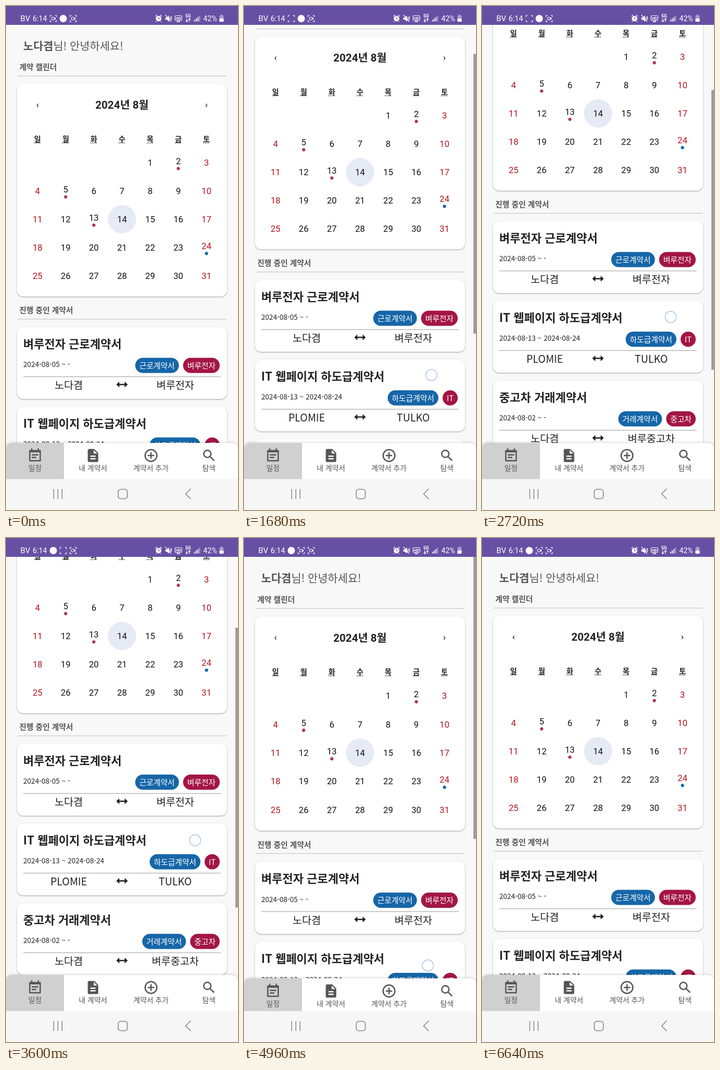
These frames come from a looping animation (444x962 px, 6720 ms). An HTML page:

```html
<!DOCTYPE html>
<html lang="ko">
<head>
<meta charset="utf-8">
<style>
  html, body { margin: 0; height: 100%; overflow: hidden; background: #f8f8f8; }
  svg { display: block; width: 100vw; height: 100vh; }
  text { font-family: "Noto Sans CJK KR", "Noto Sans CJK JP", sans-serif; white-space: pre; }
  .num { font-family: Roboto, "Noto Sans CJK KR", "Noto Sans CJK JP", sans-serif; }
  .card { fill: #fff; filter: drop-shadow(0 1px 1px rgba(0, 0, 0, .36)); }
  .line { fill: none; stroke-width: 2; stroke-linejoin: round; }
</style>
</head>
<body>
<svg id="stage" viewBox="0 0 444 962" preserveAspectRatio="none"></svg>
<script>
const LOOP = 6720, STEP = 80, TOP = 36;
const BLUE = '#1666a8', RED = '#a31545', GRAY = '#555';
const PERSON = '노다겸', COMPANY = '벼루전자';

// Text centred vertically on cy.
const text = (x, cy, size, label, { fill = '#222', weight = 400, anchor = 'start', cls = '' } = {}) =>
  `<text x="${x}" y="${cy + size * .36}" font-size="${size}" fill="${fill}" font-weight="${weight}" text-anchor="${anchor}" class="${cls}">${label}</text>`;
const middle = (x, cy, size, label, options) => text(x, cy, size, label, { anchor: 'middle', ...options });
const rect = (x, y, w, h, fill, r = 0, more = '') =>
  `<rect x="${x}" y="${y}" width="${w}" height="${h}" rx="${r}" fill="${fill}" ${more}/>`;
const circle = (x, y, r, fill, more = '') => `<circle cx="${x}" cy="${y}" r="${r}" fill="${fill}" ${more}/>`;
const path = (d, more) => `<path d="${d}" ${more}/>`;
const section = (cy, label) =>
  text(25.5, cy, 14.7, label, { fill: GRAY, weight: 700 }) + rect(22, cy + 16, 400, 1.3, '#cacaca');

function calendar() {
  const columnX = column => 60.3 + column * 53.9;
  const events = { 2: '#b03360', 5: '#b03360', 13: '#b03360', 24: BLUE };
  let out = rect(21, 149, 402, 405.5, '#fff', 12, 'class="card"');
  out += middle(222, 189, 20.6, '2024년 8월', { weight: 700, cls: 'num' });
  out += middle(60.3, 188, 17, '‹', { cls: 'num', fill: '#000' }) + middle(383.5, 188, 17, '›', { cls: 'num', fill: '#000' });
  [...'일월화수목금토'].forEach((day, column) => {
    const x = columnX(column);
    out += middle(x, 254, 14.2, day, { weight: 700 });
    out += path(`M${x - 6.5} 261.3h13`, 'stroke="#222" stroke-width="1.3" stroke-dasharray="2 1.2"');
  });
  out += circle(222, 407, 27, '#e6eaf5');
  for (let day = 1; day <= 31; day++) {
    const column = (day + 3) % 7, x = columnX(column);
    const y = 299 + Math.floor((day + 3) / 7) * 54;
    const fill = column % 6 ? '#111' : '#b5121b';
    out += middle(x, events[day] ? y - 3 : y, 16.6, day, { fill, cls: 'num' });
    if (events[day]) out += circle(x, y + 11.3, 3.1, events[day]);
  }
  return out;
}

function chip(right, y, label, fill) {
  const width = 16 + label.length * 14.7 * (/[A-Z]/.test(label) ? .44 : .92);
  return {
    left: right - width,
    svg: rect(right - width, y, width, 29, fill, 14.5) +
      middle(right - width / 2, y + 15, 14.7, label, { fill: '#fff' }),
  };
}

function contract(index, { title, dates, kind, tag, from, to }) {
  const y = 613 + index * 152;
  const tagChip = chip(409, y + 58.5, tag, RED);
  const kindChip = chip(tagChip.left - 8, y + 58.5, kind, BLUE);
  return rect(21, y, 402, 137, '#fff', 12, 'class="card"') +
    text(33, y + 32, 22, title, { weight: 700 }) +
    text(33, y + 71.5, 13.6, dates) +
    kindChip.svg + tagChip.svg +
    rect(33, y + 94, 378, 1.2, '#aaa') +
    middle(120, y + 111, 19.6, from) + middle(324, y + 111, 19.6, to) +
    path(`M211 ${y + 109.5}l6-5.5v4.3h10v-4.3l6 5.5-6 5.5v-4.3h-10v4.3z`, 'fill="#222"');
}

function navigation() {
  const tabs = [
    ['일정', '<path class="line" d="M4 4.5H20V20H4zM4 6.2H20M7 1V4M17 1V4M7 11H17M7 15H14"/>'],
    ['내 계약서', '<path fill="#555" stroke="none" fill-rule="evenodd" d="M6 2H14L20 8V20Q20 22 18 22H6Q4 22 4 20V4Q4 2 6 2zM13 3.5V9H18.5zM8 12V14H16V12zM8 16V18H16V16z"/>'],
    ['계약서 추가', '<path class="line" d="M12 7V17M7 12H17"/><circle class="line" cx="12" cy="12" r="9"/>'],
    ['탐색', '<path class="line" d="M14 14L19.8 19.8"/><circle class="line" cx="9.5" cy="9.5" r="5.5"/>'],
  ];
  const shape = 'M0 910V846Q0 834 12 834H432Q444 834 444 846V910z';
  return path(shape, 'fill="#fff" style="filter:drop-shadow(0 -1px 2px rgba(0,0,0,.16))"') +
    path('M0 910V846Q0 834 12 834H111V910z', 'fill="#d0d0d0"') +
    tabs.map(([label, icon], i) => {
      const x = 55.5 + i * 111;
      return `<g transform="translate(${x - 15} 843) scale(1.25)" stroke="${GRAY}">${icon}</g>` +
        middle(x, 882.5, 13.8, label, { fill: GRAY });
    }).join('');
}

// Screen-recording icon: corner brackets around a small camera.
const recorder = (x, id = '') => `<g transform="translate(${x} 24)">` +
  path('M-6-3V-6H-3M3-6H6V-3M6 3V6H3M-3 6H-6V3', 'fill="none" stroke="#fff" stroke-width="1.2"') +
  `<g id="${id}">` + rect(-3, -2.5, 5, 5, 'none', 1, 'stroke="#fff" stroke-width="1.2"') +
  path('M2 0L4.5-2.5V2.5z', 'fill="#fff"') + '</g></g>';

function statusBar() {
  const white = { fill: '#fff', cls: 'num' };
  const stroke = 'fill="none" stroke="#fff" stroke-width="1.3"';
  let out = rect(0, 0, 444, TOP, '#6650a3');
  out += text(27.5, 24, 15, 'BV', white) + text(51, 24, 14.2, '6:14', white);
  out += `<g id="recording">${recorder(0, 'camera')}</g><g id="message">${circle(0, 24, 7, '#fff')}</g>` + recorder(128.5);
  // Alarm, mute, HD, mobile data, signal, battery
  out += circle(292, 24, 5.3, '#fff') + path('M286 20l3-3M298 20l-3-3M288 29l-1 1.5M296 29l1 1.5', stroke);
  out += path('M292 21v3.5h2.5', 'fill="none" stroke="#6650a3" stroke-width="1.2"');
  out += path('M305 22h3l4-4v12l-4-4h-3z', 'fill="#fff"') + path('M305 17l11 13M314 21v5M316.5 19v8', stroke);
  out += rect(323.5, 18.5, 13, 9, 'none', 1.5, 'stroke="#fff" stroke-width="1.1"') + middle(330, 23, 7.5, 'HD', { ...white, weight: 700 });
  out += path('M328 28v2h4v-2', stroke);
  out += middle(348.5, 19, 8.5, '5G', { ...white, weight: 700 });
  out += path('M346 24v6M344 28l2 2 2-2M351 30v-6M349 26l2-2 2 2', stroke);
  for (let i = 0; i < 4; i++) out += rect(360 + i * 3.2, 26.5 - i * 2.7, 1.8, 3 + i * 2.7, '#fff', 0, i > 2 ? 'opacity=".5"' : '');
  out += text(377.5, 24, 14.2, '42%', white);
  out += rect(408.5, 18, 8, 12, '#a99bce', 1.5) + rect(410.5, 16.5, 4, 2, '#a99bce') + rect(408.5, 24, 8, 6, '#fff', 1.5);
  return out;
}

function systemBar() {
  return rect(0, 903, 444, 59, '#f6f6f6') +
    path('M91.3 922v19M99.3 922v19M107.3 922v19', 'stroke="#888" stroke-width="1.5"') +
    rect(214.7, 922.5, 17.6, 18, 'none', 5, 'stroke="#888" stroke-width="1.6"') +
    path('M353.5 921.5l-9.7 9.7 9.7 9.7', 'fill="none" stroke="#888" stroke-width="1.6"');
}

const contracts = [
  { title: `${COMPANY} 근로계약서`, dates: '2024-08-05 ~ -', kind: '근로계약서', tag: COMPANY, from: PERSON, to: COMPANY },
  { title: 'IT 웹페이지 하도급계약서', dates: '2024-08-13 ~ 2024-08-24', kind: '하도급계약서', tag: 'IT', from: 'PLOMIE', to: 'TULKO' },
  { title: '중고차 거래계약서', dates: '2024-08-02 ~ -', kind: '거래계약서', tag: '중고차', from: PERSON, to: '벼루중고차' },
];
const greeting = `<tspan font-weight="700">${PERSON}</tspan>님! 안녕하세요!`;

document.getElementById('stage').innerHTML =
  rect(0, 0, 444, 962, '#f8f8f8') +
  '<g id="app"><g id="page">' +
  text(33, 76.5, 20.8, greeting, { fill: GRAY }) +
  section(117, '계약 캘린더') + calendar() +
  section(581, '진행 중인 계약서') + contracts.map((item, i) => contract(i, item)).join('') +
  '</g>' + navigation() + rect(439, TOP, 5, 534, '#9c9c9f', 0, 'id="scrollbar"') + '</g>' +
  statusBar() + systemBar() +
  circle(0, 0, 10.7, 'rgba(255,255,255,.8)', 'id="touch" stroke="#a9c6e6" stroke-width="1.4"');

const part = Object.fromEntries(['app', 'page', 'scrollbar', 'recording', 'camera', 'message', 'touch']
  .map(id => [id, document.getElementById(id)]));

// Smooth curve through [time, value] points, resting wherever the value is flat.
function track(points) {
  const slope = i => (points[i + 1][1] - points[i][1]) / (points[i + 1][0] - points[i][0]);
  const tangents = points.map((_, i) => {
    if (i === 0 || i === points.length - 1 || slope(i - 1) * slope(i) <= 0) return 0;
    return (points[i + 1][1] - points[i - 1][1]) / (points[i + 1][0] - points[i - 1][0]);
  });
  return t => {
    if (t <= points[0][0]) return points[0][1];
    const i = points.findIndex(point => point[0] >= t) - 1;
    if (i < 0) return points[points.length - 1][1];
    const [t0, a] = points[i], [t1, b] = points[i + 1], d = t1 - t0, u = (t - t0) / d;
    return a + (b - a) * u * u * (3 - 2 * u) +
      d * u * (1 - u) * (tangents[i] * (1 - u) - tangents[i + 1] * u);
  };
}

// Negative drag is overscroll, shown as a stretch of the whole app.
const drag = track([[1040, 0], [1280, 21], [2080, 155], [2680, 200], [3280, 220], [3600, 220],
  [4320, 90], [4800, 0], [4960, -15], [5040, -16], [5440, 0]]);
const fingerX = track([[1040, 358], [1280, 358], [2080, 360], [3600, 362], [4320, 344], [4960, 352]]);
const fingerY = track([[1040, 803], [1200, 794], [2080, 795], [3600, 797], [4320, 801]]);
const blinks = [320, 640, 1440, 1840, 2400, 2800, 3280, 3760, 4240, 4720, 5280, 5680, 6240, 6640];

function render(t) {
  const offset = drag(t), scroll = Math.max(0, offset), stretch = 1 + Math.max(0, -offset) * .00054;
  part.app.setAttribute('transform', `translate(0 ${TOP * (1 - stretch)}) scale(1 ${stretch})`);
  part.page.setAttribute('transform', `translate(0 ${-Math.round(scroll)})`);
  part.scrollbar.setAttribute('y', TOP + scroll * .615);
  part.scrollbar.setAttribute('opacity', t < 1040 ? 0 : Math.min(1, Math.max(0, (5440 - t) / 320)));

  const swapped = t >= 2800;
  part.recording.setAttribute('transform', `translate(${swapped ? 109.5 : 90.5} 0)`);
  part.message.setAttribute('transform', `translate(${swapped ? 90.5 : 109.5} 0)`);
  part.camera.setAttribute('opacity', blinks.filter(time => time <= t).length % 2 ? 0 : 1);

  part.touch.setAttribute('opacity', t >= 1040 && t < 5040 ? 1 : 0);
  part.touch.setAttribute('transform', `translate(${fingerX(t)} ${fingerY(t) - offset})`);
}

function tick() {
  render(Math.floor(performance.now() % LOOP / STEP) * STEP);
  requestAnimationFrame(tick);
}
tick();
</script>
</body>
</html>
```
